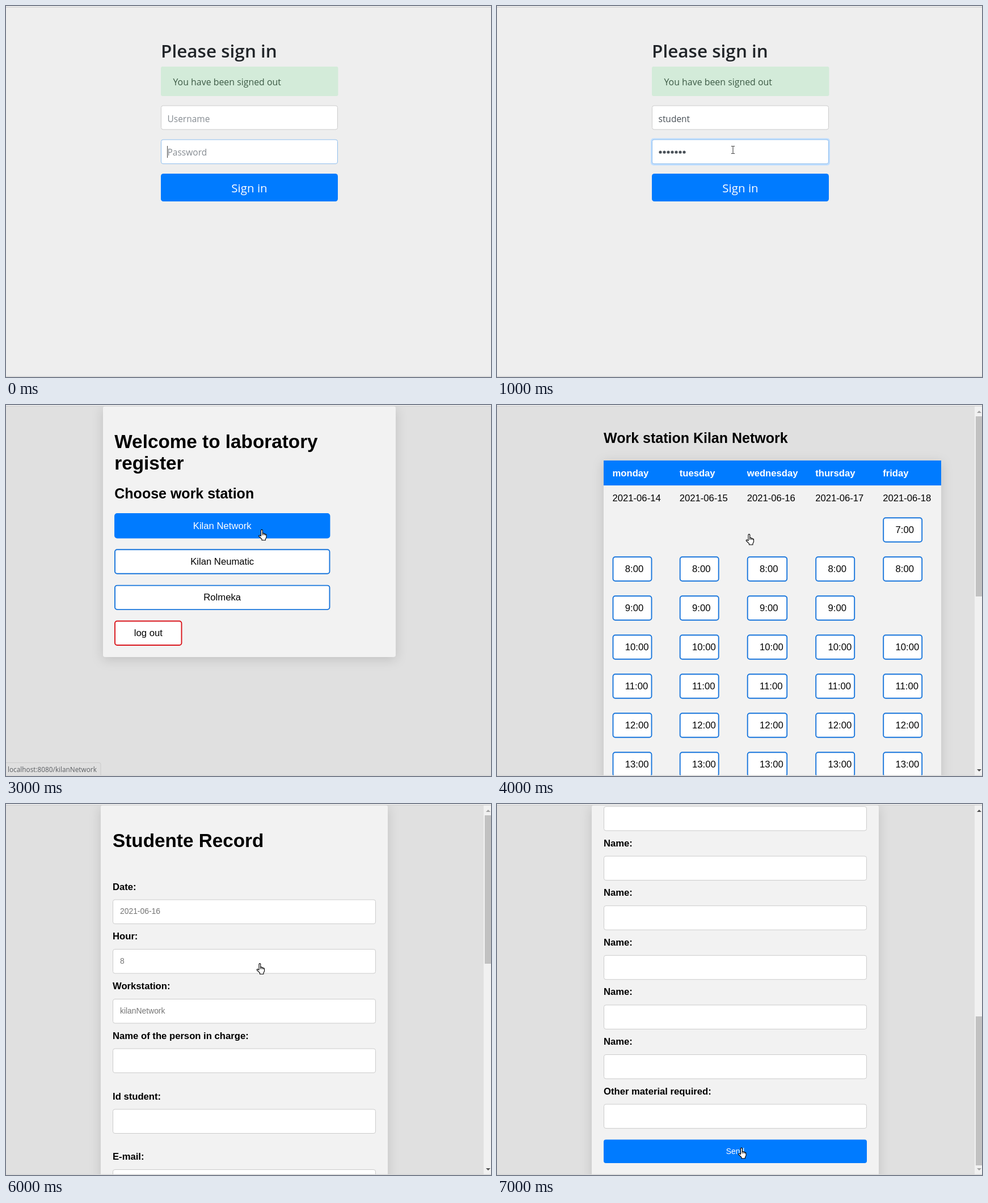
Recreate the animation shown at these times as an HTML page. Size 855x655 px, loop 8 s.

```html
<!DOCTYPE html>
<html lang="en">
<head>
<meta charset="utf-8">
<style>
  html, body { margin: 0; width: 100%; height: 100%; overflow: hidden; background: #e0e0e0; }
  svg { display: block; width: 855px; height: 655px; }
  text { font-family: "Liberation Sans", Arial, sans-serif; font-size: 16.67px; white-space: pre; }
  .ui { font-family: "Open Sans", sans-serif; }
  .bold { font-weight: 700; }
  .card { fill: #f2f2f2; filter: drop-shadow(0 4px 10px rgba(0, 0, 0, .14)); }
</style>
</head>
<body>
<svg id="stage" viewBox="0 0 855 655"></svg>
<script>
const BLUE = '#007bff', EDGE = '#1976dc', RED = '#d9151c';

const rect = (x, y, w, h, fill, extra = '') =>
  `<rect x="${x}" y="${y}" width="${w}" height="${h}" fill="${fill}" ${extra}/>`;
const text = (x, y, str, { size = 16.67, fill = '#000', cls = '', anchor = 'start', weight = '' } = {}) =>
  `<text x="${x}" y="${y}" class="${cls}" fill="${fill}" text-anchor="${anchor}" style="font-size:${size}px;${
    weight && `font-weight:${weight}`}">${str}</text>`;
const bold = (x, y, str, size = 16.67, fill = '#000') => text(x, y, str, { size, fill, cls: 'bold' });
const ui = (x, y, str, size, fill, more = {}) => text(x, y, str, { size, fill, cls: 'ui', ...more });

const frame = (body, bg = '#e0e0e0') =>
  rect(0, 0, 855, 655, bg) + body +
  rect(0, 0, 855, 1, '#fafafa') + rect(0, 1, 855, 1.5, '#d3d3d3') +
  rect(0, 653.5, 855, 1.5, '#d8d8d8');

const button = (x, y, w, h, { fill = '#fff', edge = EDGE } = {}) =>
  rect(x + 1, y + 1, w - 2, h - 2, fill, `rx="4" stroke="${edge}" stroke-width="1.9"`);
const field = (x, y, w, h, edge = '#ccc') =>
  rect(x + .5, y + .5, w - 1, h - 1, '#fff', `rx="3.5" stroke="${edge}"`);

const hand = (x, y) => `<g transform="translate(${x} ${y})" stroke="#000" stroke-width="1.1" stroke-linejoin="round">
  <path fill="#fff" d="M4.5 12V2a1.4 1.4 0 0 1 2.8 0v5q2-.6 2.6.9q1.800-.5 2.400.8q1.700-.2 1.700 1.500v4l-1.600 3v2H6v-2L1 12.500q-.8-1.800 1-2z"/>
  <path fill="none" d="M7.300 7v3.500M9.900 8v2.500M12.300 8.700v2"/></g>`;
const beam = (x, y) =>
  `<path d="M${x - 3} ${y - 6.5}h2.500l.5 .5l.5-.5h2.500M${x} ${y - 6}v12M${x - 3} ${y + 6.5}h2.500l.5-.5l.5 .5h2.500" fill="none" stroke="#333"/>`;

const status = (str, w) =>
  rect(-4, 631.5, w + 4, 30, '#dfdfdf', 'rx="3" stroke="#cbcbcb"') + ui(3, 648, str, 11.8, '#5c5f63');

const scrollbar = (top, bottom, upFill = '#505050', downFill = '#505050') =>
  rect(842, 2, 13, 653, '#f1f1f1') + rect(844, top, 11, bottom - top, '#c1c1c1') +
  `<path d="M846 14l4-4l4 4z" fill="${upFill}"/><path d="M846 643l4 4l4-4z" fill="${downFill}"/>`;

function signIn(filled) {
  const grey = '#868c92';
  return frame(
    ui(273, 91, 'Please sign in', 31.5, '#212529', { weight: 600 }) +
    rect(273, 107, 312.5, 52, '#d3ebd9', 'rx="3"') +
    ui(294.5, 139.5, 'You have been signed out', 15.9, '#3c5a45') +
    (filled ? rect(271, 233.5, 316, 48, '#bfdeff', 'rx="5"') : '') +
    field(273, 175.5, 312, 43) + field(273, 235.5, 312, 43.5, '#8fbdec') +
    (filled
      ? ui(284.5, 204.5, 'student', 15.5, '#495057') +
        Array.from({ length: 7 }, (_, i) => `<circle cx="${288 + i * 7}" cy="258" r="2.6" fill="#495057"/>`).join('') +
        beam(416, 254)
      : ui(284.5, 204.5, 'Username', 15.5, grey) + ui(284.5, 264, 'Password', 15.5, grey) +
        rect(284, 247, 1, 21, '#444')) +
    rect(273, 296, 312, 49, BLUE, 'rx="4.5"') +
    ui(429, 329, 'Sign in', 20.5, '#fff', { anchor: 'middle' }), '#eee');
}

function stations(hovered, overlay) {
  const names = ['Kilan Network', 'Kilan Neumatic', 'Rolmeka'];
  const list = names.map((name, i) => {
    const y = 191 + i * 63.3, on = i === hovered;
    return button(191, y, 380.5, 44.5, on ? { fill: BLUE, edge: BLUE } : {}) +
      text(381.2, y + 27.5, name, { anchor: 'middle', fill: on ? '#fff' : '#000' });
  }).join('');
  return frame(
    rect(171, 2, 516, 443, '', 'class="card" rx="4"') +
    bold(191.3, 75.5, 'Welcome to laboratory', 33.3) + bold(191.3, 113.5, 'register', 33.3) +
    bold(191.3, 165, 'Choose work station', 25) + list +
    button(191, 380.5, 119.5, 44.5, { edge: RED }) +
    text(250.8, 408, 'log out', { anchor: 'middle' }) + overlay);
}

function timetable(hovered, overlay) {
  const days = ['monday', 'tuesday', 'wednesday', 'thursday', 'friday'];
  const left = [203.5, 321.7, 440.7, 561.2, 680.2];
  let cells = '';
  days.forEach((day, d) => {
    cells += bold(left[d], 125.5, day, 16.67, '#fff') + text(left[d], 169.5, `2021-06-${14 + d}`);
    for (let hour = 7; hour <= 13; hour++) {
      const friday = d === 4;
      if (hour === 7 && !friday || hour === 9 && friday) continue;
      const y = 198.3 + (hour - 7) * 69, on = hovered && d === 2 && hour === 8;
      cells += button(left[d], y, d === 2 ? 71.5 : 70, 44.5, on ? { fill: BLUE, edge: BLUE } : {}) +
        text(left[d] + 22.300, y + 27.700, `${hour}:00`, { fill: on ? '#fff' : '#000' });
    }
  });
  return frame(
    bold(188, 66.5, 'Work station Kilan Network', 25) +
    rect(188, 98, 595, 580, '', 'class="card"') + rect(188, 98, 595, 44, BLUE) +
    cells + scrollbar(20, 338, '#a3a3a3') + overlay);
}

const formCard = rect(167, 2, 506, 680, '', 'class="card" rx="4"');
const formRow = ([y, label, value = '']) =>
  bold(188, y - 17, label) + field(188, y, 464, 43.5) +
  text(201, y + 25.5, value, { size: 13.89, fill: '#757575' });

const formTop = () => frame(
  formCard + bold(188, 75.5, 'Studente Record', 33.3) +
  [[168.500, 'Date:', '2021-06-16'], [256, 'Hour:', '8'], [344, 'Workstation:', 'kilanNetwork'],
   [431.5, 'Name of the person in charge:'], [538.5, 'Id student:'], [645, 'E-mail:']].map(formRow).join('') +
  scrollbar(20, 282, '#a3a3a3') + hand(441.5, 281));

const formEnd = () => frame(
  formCard +
  ['', 'Name:', 'Name:', 'Name:', 'Name:', 'Name:', 'Other material required:']
    .map((label, i) => formRow([4 + i * 87.6, label])).join('') +
  rect(188, 592.5, 464, 41.5, BLUE, 'rx="4"') +
  text(420, 618, 'Send', { size: 13.89, fill: '#fff', anchor: 'middle' }) +
  scrollbar(375, 638, '#505050', '#a3a3a3') + hand(425, 606.5));

const scenes = [
  signIn(false),
  signIn(true),
  stations(-1, beam(416, 254)),
  stations(0, status('localhost:8080/kilanNetwork', 167) + hand(445, 219.5)),
  timetable(false, hand(438.5, 227.5)),
  timetable(true, status('localhost:8080/kilanNetwork/2021-06-16/8', 238) + hand(441.5, 281)),
  formTop(),
  formEnd(),
];
// Scenes are one second each, with the sixth and seventh views following the timetable.
const stage = document.getElementById('stage');
const order = [0, 1, 2, 3, 4, 5, 6, 7];
let shown = -1;
function draw(now) {
  const scene = order[Math.floor(now / 1000) % order.length];
  if (scene !== shown) stage.innerHTML = scenes[shown = scene];
  requestAnimationFrame(draw);
}
draw(performance.now());
</script>
</body>
</html>
```
